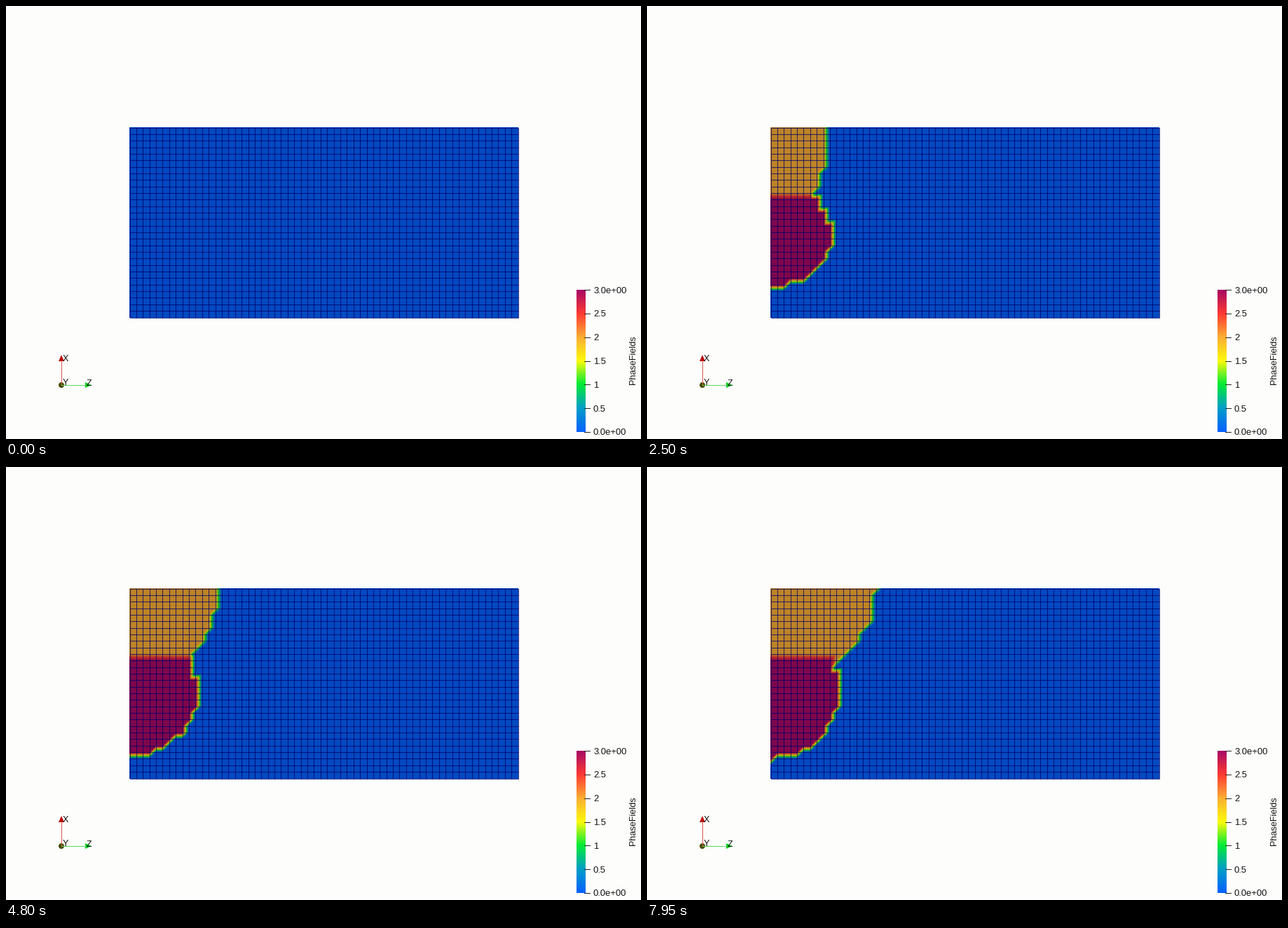
A matplotlib script for the animation above (8000 ms loop, 906x618 px).

```python
import numpy as np
import matplotlib.pyplot as plt
from matplotlib.animation import FuncAnimation
from matplotlib.collections import LineCollection
from matplotlib.colors import LinearSegmentedColormap
from matplotlib.patches import Circle, Polygon

W, H, DPI = 906, 618, 100
STEP, LOOP = 50, 8000
PX = 72 / DPI
plt.rcParams["font.family"] = "Liberation Sans"

# Mesh of 60 x 30 nodes; the outer wires run through pixel centres
NX, NY = 60, 30
LEFT, RIGHT, TOP, BOTTOM = 176, 731, 173, 445
INTERFACE = 11
SHADE = 0.76

# One colour per half unit, from 0 to 3
CMAP = LinearSegmentedColormap.from_list(
    "phase", ["#0561fe", "#009ec8", "#00eb37", "#fcfa0a", "#faaf32",
              "#ff3a32", "#a80a64"], N=512)

# Key points of the two growing half ellipses, in node units
TIMES = [1600, 2500, 3800, 4800, 5950, 7880]
LOWER_REACH = [8.6, 9.3, 10.1, 10.42, 10.55, 10.55]
LOWER_MID = [15.8, 16.2, 16.3, 15.8, 15.5, 15.5]
LOWER_HALF = [7.2, 8.1, 9.0, 9.7, 10.51, 10.51]
UPPER_REACH = [8.7, 9.0, 11.8, 13.3, 14.6, 16.01]
UPPER_HALF = 14.4

X, Y = np.meshgrid(np.arange(NX), np.arange(NY))


def ease_in(t, start, end):
    """Square-root growth from 0 to 1."""
    return np.sqrt(np.clip((t - start) / (end - start), 0, 1))


def reach(a, dy):
    return a * np.sqrt(np.clip(1 - dy ** 2, 0, 1))


def node_values(t):
    # Late growth comes in bursts
    if t > 6800:
        t = 6800 + (t - 6800) // 270 * 270

    def at(keys):
        return np.interp(t, TIMES, keys)

    size = ease_in(t, 0, 1600)
    half = max(at(LOWER_HALF) * size, 1e-6)
    lower = reach(at(LOWER_REACH) * size, (Y - at(LOWER_MID)) / half)

    # The upper phase climbs from the interface, so higher rows lag at first
    lag = np.interp(t, [1600, 2500], [0.455, 0]) * np.maximum(10 - Y, 0)
    upper = reach(at(UPPER_REACH) * ease_in(t, 600, 1600), Y / UPPER_HALF) - lag

    z = np.where(X < upper, 2.0, 0.0)
    z[(X < lower) & (Y >= INTERFACE)] = 3
    return z


def node_coords(lo, hi, n):
    """Cell index and fraction for every pixel centre between lo and hi."""
    u = np.linspace(0, n - 1, hi - lo)
    i = np.minimum(u.astype(int), n - 2)
    return i, u - i


I, FX = node_coords(LEFT, RIGHT, NX)
J, FY = node_coords(TOP, BOTTOM, NY)
J, FY = J[:, None], FY[:, None]


def mesh_image(t):
    """Linear interpolation on two triangles per cell, then colour mapping."""
    z = node_values(t)
    tl, tr, bl, br = z[J, I], z[J, I + 1], z[J + 1, I], z[J + 1, I + 1]
    a = tl + FX * (tr - tl) + FY * (bl - tl)
    b = br + (1 - FX) * (bl - br) + (1 - FY) * (tr - br)
    return CMAP(np.where(FX + FY <= 1, a, b) / 3)[..., :3] * SHADE


fig = plt.figure(figsize=(W / DPI, H / DPI), dpi=DPI, facecolor="#fdfdfc")
ax = fig.add_axes([0, 0, 1, 1])
ax.axis("off")


def label(x, y, s, size=13, **kw):
    kw = {"ha": "left", "va": "center_baseline", "color": "#111111", **kw}
    ax.text(x, y, s, fontsize=size * PX, **kw)


def line(xs, ys, color):
    ax.plot(xs, ys, color=color, lw=PX)


def picture(data, *extent):
    return ax.imshow(data, extent=extent, interpolation="nearest", aspect="auto")


# Mesh
mesh = picture(mesh_image(0), LEFT, RIGHT, BOTTOM, TOP)
x0, x1, y0, y1 = LEFT + 0.5, RIGHT - 0.5, TOP + 0.5, BOTTOM - 0.5
wires = [[(x, y0), (x, y1)] for x in np.linspace(x0, x1, NX)]
wires += [[(x0, y), (x1, y)] for y in np.linspace(y0, y1, NY)]
ax.add_collection(LineCollection(wires, colors=[(0, 0, 0.42, 0.72)],
                                 linewidths=1.1 * PX))

# Colour bar
picture(CMAP(np.linspace(1, 0, 203))[:, None, :3], 814, 827, 608, 405)
for k in range(7):
    y = 608 - k * 203 / 6
    line([825, 833], [y, y], "#222222")
    label(838, y, f"{k / 2:.1e}" if k in (0, 6) else f"{k / 2:g}")
label(895, 505.5, "PhaseFields", 12.6, rotation=90, ha="center", va="center")

# Orientation axes
line([79, 79], [541, 506], "#e0584c")
line([79, 114], [541, 541], "#58d858")
ax.add_patch(Polygon([(75, 507), (83, 507), (79, 498)], color="#b80808", lw=0))
ax.add_patch(Polygon([(113, 537), (113, 545), (122, 541)], color="#08cc20", lw=0))
ax.add_patch(Circle((79, 541), 4, color="#4a4c08", lw=0))
for x, y, s in [(84.5, 502.5, "X"), (85, 536.5, "Y"), (118.5, 537, "Z")]:
    label(x, y, s, 12.5, ha="center")

ax.set_xlim(0, W)
ax.set_ylim(H, 0)


def update(i):
    mesh.set_data(mesh_image(i * STEP))
    return [mesh]


anim = FuncAnimation(fig, update, frames=LOOP // STEP, interval=STEP,
                     repeat=True, repeat_delay=0)
plt.show()
```
